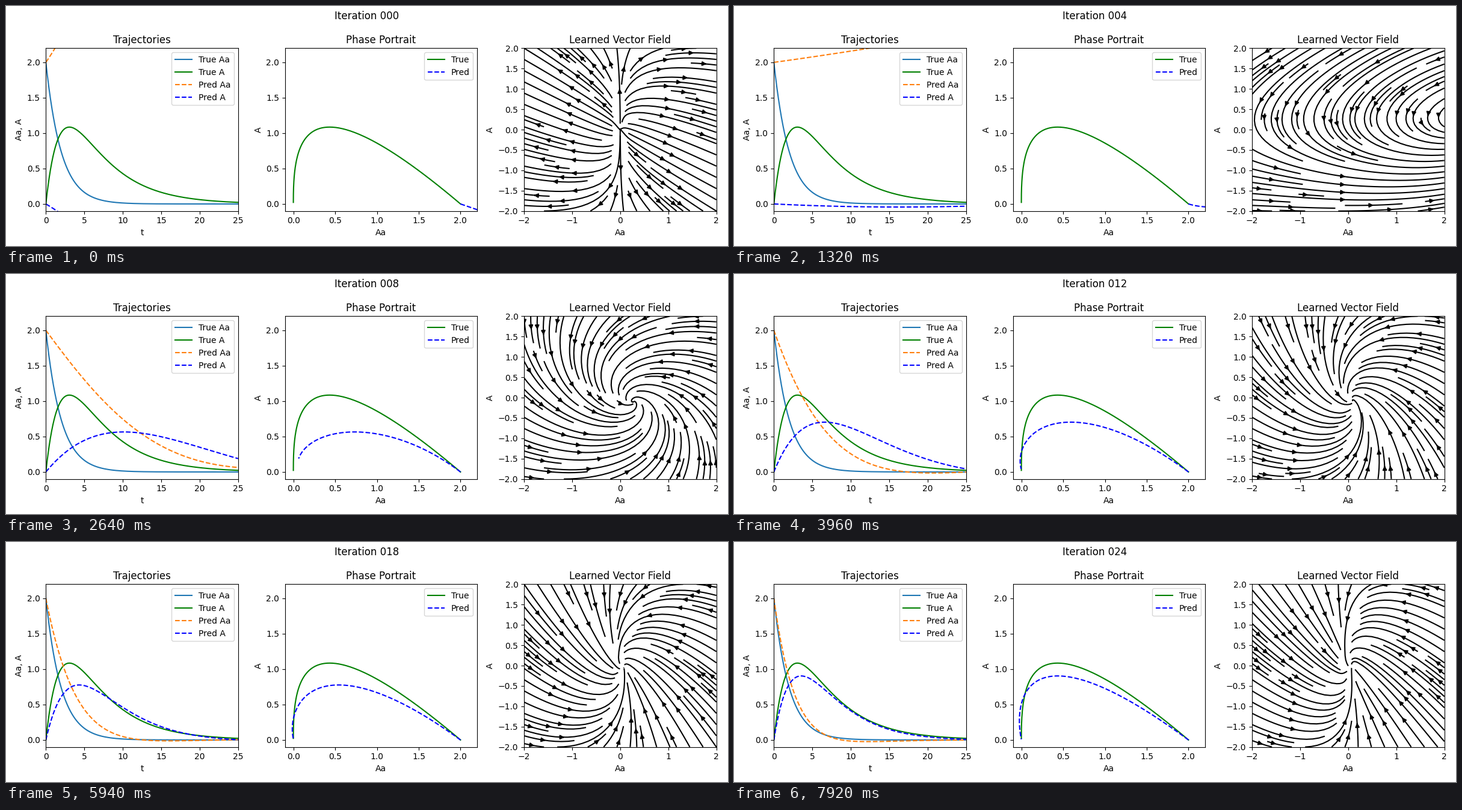
Recreate the animation shown at these times as a matplotlib script. Size 1200x400 px, loop 8000 ms.

```python
import matplotlib.pyplot as plt
import numpy as np
from matplotlib.animation import FuncAnimation

STEP_MS = 80          # animation tick
ITER_MS = 330         # time each training iteration stays on screen
LOOP_MS = 8000

K1, K2 = 0.5, 0.2     # decay rates of the true system
T = np.linspace(0, 25, 501)


def bump(n, peak):
    """Rise from 0 to 1 at n = peak, then a slow fall."""
    return n / peak * np.exp(1 - n / peak)


class Model:
    """Learned system after n training iterations."""

    def __init__(self, n):
        bend = bump(n, 4) ** 4
        drift = bump(n, 4.5)
        self.xx = 0.080 - 0.0199 * n
        self.xy = -0.038 * (1 - np.exp(-n / 4)) - 0.050 * bump(n, 7) ** 4
        self.yx = -0.032 + 0.0134 * n + 0.0001 * n ** 2 - 0.016 * bend
        self.yy = max(0.026 - 0.0104 * n, -0.165)
        self.yxx = 0.0025 * bend
        self.x0 = 0.014 * drift
        self.y0 = -0.030 * drift

    def velocity(self, x, y):
        dx = self.xx * x + self.xy * y + self.x0
        dy = self.yx * x + self.yy * y + self.yxx * x ** 2 + self.y0
        return np.array([dx, dy])

    def solve(self):
        """Runge-Kutta solution starting at (2, 0)."""
        h = T[1] - T[0]
        path = [np.array([2.0, 0.0])]
        for _ in T[1:]:
            p = path[-1]
            k1 = self.velocity(*p)
            k2 = self.velocity(*(p + h / 2 * k1))
            k3 = self.velocity(*(p + h / 2 * k2))
            k4 = self.velocity(*(p + h * k3))
            path.append(p + h / 6 * (k1 + 2 * k2 + 2 * k3 + k4))
        return np.array(path).T


def setup(ax, title, xlabel, ylabel, xlim, ylim):
    ax.set(title=title, xlabel=xlabel, ylabel=ylabel, xlim=xlim, ylim=ylim)


fig, (ax_time, ax_phase, ax_field) = plt.subplots(1, 3, figsize=(12, 4), dpi=100)
heading = fig.suptitle("Iteration 000")

true_x = 2 * np.exp(-K1 * T)
true_y = 2 * K1 / (K1 - K2) * (np.exp(-K2 * T) - np.exp(-K1 * T))

ax_time.plot(T, true_x, color="C0", label="True Aa")
ax_time.plot(T, true_y, "g-", label="True A")
pred_x, = ax_time.plot([], [], "--", color="C1", label="Pred Aa")
pred_y, = ax_time.plot([], [], "b--", label="Pred A")
setup(ax_time, "Trajectories", "t", "Aa, A", (0, 25), (-0.1, 2.2))
ax_time.legend(loc="upper right")

ax_phase.plot(true_x, true_y, "g-", label="True")
pred_phase, = ax_phase.plot([], [], "b--", label="Pred")
setup(ax_phase, "Phase Portrait", "Aa", "A", (-0.1, 2.2), (-0.1, 2.2))
ax_phase.legend(loc="upper right")

setup(ax_field, "Learned Vector Field", "Aa", "A", (-2, 2), (-2, 2))
fig.tight_layout()

grid_y, grid_x = np.mgrid[-2:2:21j, -2:2:21j]
shown = None


def draw_field(model):
    for artist in list(ax_field.collections) + list(ax_field.patches):
        artist.remove()
    u, v = model.velocity(grid_x, grid_y)
    size = np.hypot(u, v) + 1e-9
    ax_field.streamplot(grid_x, grid_y, u / size, v / size, color="black")
    ax_field.set(xlim=(-2, 2), ylim=(-2, 2))


def show_iteration(n):
    global shown
    if n == shown:
        return
    shown = n
    model = Model(n)
    x, y = model.solve()
    pred_x.set_data(T, x)
    pred_y.set_data(T, y)
    pred_phase.set_data(x, y)
    heading.set_text(f"Iteration {n:03d}")
    draw_field(model)


def update(frame):
    show_iteration(((frame + 1) * STEP_MS - 1) // ITER_MS)
    return []


def reset():
    show_iteration(0)
    return []


anim = FuncAnimation(fig, update, frames=LOOP_MS // STEP_MS, init_func=reset,
                     interval=STEP_MS, repeat=True, repeat_delay=0)
plt.show()
```
